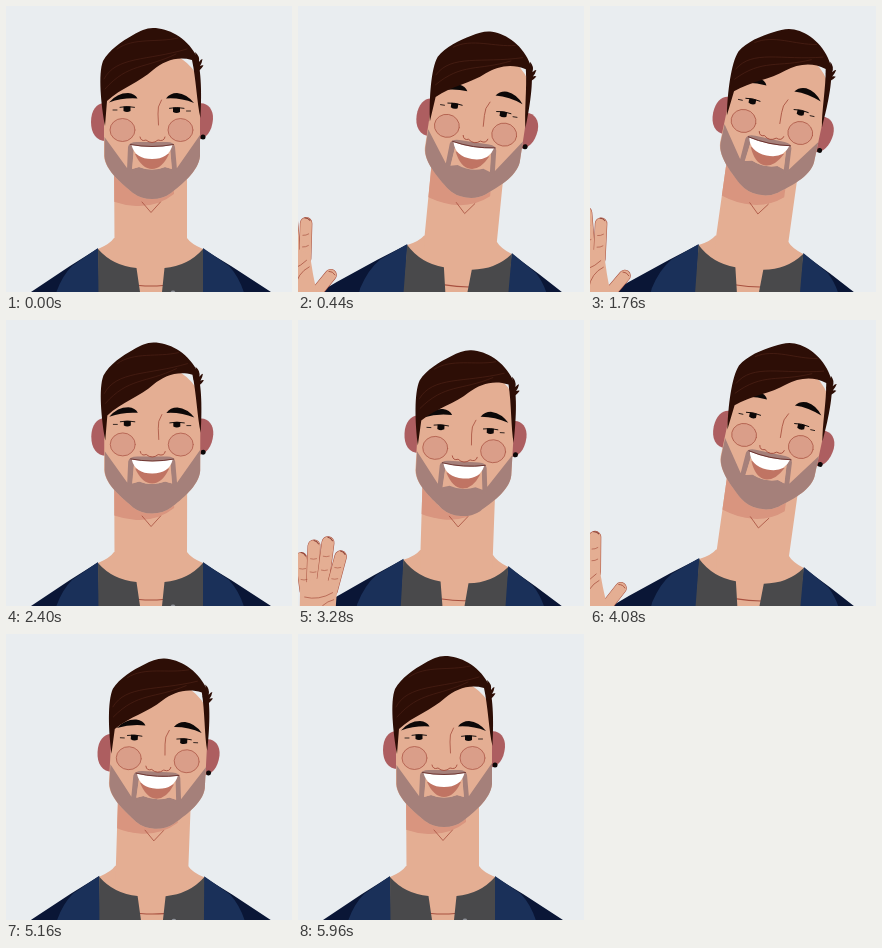
These frames come from a looping animation (286 px wide and 286 px high, 6 s). An HTML page with a canvas:

```html
<!DOCTYPE html>
<html lang="en">
<head>
<meta charset="utf-8">
<title>Waving man</title>
<style>
html, body { margin: 0; width: 100%; height: 100%; overflow: hidden; background: #e9edf0; }
canvas { display: block; width: 100vw; height: 100vh; }
</style>
</head>
<body>
<canvas id="stage"></canvas>
<script>
const SIZE = 286, WAVE = 3000, RAD = Math.PI / 180;
const canvas = document.getElementById('stage');
const ctx = canvas.getContext('2d');
const C = {
  bg: '#e9edf0', skin: '#e4ae93', shade: '#d9957f', beard: '#a5807a', ear: '#ad5e60',
  hair: '#2d0e06', strand: '#54261a', line: '#a8503f', cheek: '#da9e89',
  navy: '#1a3059', dark: '#0a1636', shirt: '#49494b', lip: '#c07463', black: '#0c0808'
};

const smooth = u => u * u * (3 - 2 * u);
const span = (t, a, b) => Math.min(1, Math.max(0, (t - a) / (b - a)));

function fill(d, color) {
  ctx.fillStyle = color;
  ctx.fill(new Path2D(d));
}
function stroke(d, color, width) {
  ctx.strokeStyle = color;
  ctx.lineWidth = width;
  ctx.stroke(new Path2D(d));
}
function dot(x, y, r, color) {
  ctx.beginPath();
  ctx.arc(x, y, r, 0, 2 * Math.PI);
  ctx.fillStyle = color;
  ctx.fill();
}
// Runs draw with (px, py) moved by (dx, dy) and turned by deg around it.
function placed(px, py, dx, dy, deg, draw) {
  ctx.save();
  ctx.translate(px + dx, py + dy);
  ctx.rotate(deg * RAD);
  ctx.translate(-px, -py);
  draw();
  ctx.restore();
}

function pose(p) {
  const back = span(p, 1830, 2600);
  const body = smooth(span(p, 0, 400)) - smooth(span(p, 1700, 2250));
  const head = smooth(span(p, 100, 620)) - smooth(1 - (1 - back) ** 2);
  const nod = Math.sin(Math.PI * span(p, 60, 540)) ** 2;
  const sag = Math.sin(Math.PI * span(p, 1850, 2500)) ** 2;
  return { body, head, nod, sag };
}

function inBody({ body }, draw) {
  placed(144, 243, 17 * body, 0.5 * body, 5 * body, draw);
}

function drawShoulders(state) {
  inBody(state, () => {
    fill('M108 232Q104 238 92 243L93 340H197L197 243Q185 238 181 232Z', C.skin);
    stroke('M133 279.5Q145 280.5 157 279.5', C.line, 1.1);
  });
}

function drawClothes(state) {
  inBody(state, () => {
    fill('M91 243L64 260L25 286L-50 340H94L92 243ZM197 243L225 260L265 286L345 340H195Z', C.dark);
    fill('M92 242L66 260Q55 271 49 290L40 340H95ZM197 242L223 260Q234 272 239 290L248 340H194Z', C.navy);
    fill('M92 243Q107 260 130.5 262L134 286V340H93Z', C.shirt);
    fill('M197 243Q182 260 158.5 262L156 286V340H197Z', C.shirt);
    dot(167, 287, 2.4, '#8d9097');
  });
}

function drawNeck({ body, head }) {
  const a = 5 * body * RAD, cos = Math.cos(a), sin = Math.sin(a);
  const base = x => [
    144 + 17 * body + (x - 144) * cos + 7 * sin,
    243 + 0.5 * body + (x - 144) * sin - 7 * cos
  ];
  const top = 17 * body + 13 * head;
  const [lx, ly] = base(108.5), [rx, ry] = base(181);
  const d = `M${108 + top} 150L${lx} ${ly}L${lx} 248H${rx}L${rx} ${ry}L${181 + top} 150Z`;
  fill(d, C.skin);
  ctx.save();
  ctx.clip(new Path2D(d));
  placed(145, 195, 17 * body + 9 * head, 0, 8 * head, () =>
    fill('M95 150V190Q112 199 130 200Q152 201 168 188V150Z', C.shade));
  ctx.restore();
  placed(145, 200, 17 * body + 7 * head, 1.5 * head, 5 * head, () =>
    stroke('M136 196L145 206.5L154.5 196', C.line, 0.8));
}

function drawEars(drop) {
  placed(0, 0, 0, drop, 0, () => {
    fill('M102 98C93 95 85 102 85 116C85 128 91 136 102 135Z', C.ear);
    fill('M191 98C200 95 207.5 102 207 113C206 126 200 133 191 134Z', C.ear);
    dot(197, 131, 2.5, C.black);
  });
}

function drawEye(x, y, side) {
  fill(`M${x - 3.5} ${y}H${x + 3.5}V${y + 4.5}Q${x} ${y + 6.5} ${x - 3.5} ${y + 4.5}Z`, C.black);
  stroke(`M${x - 7} ${y + 0.8}Q${x} ${y - 0.8} ${x + 7.5} ${y + 0.8}`, C.black, 0.9);
  stroke(`M${x + side * 10} ${y + 3.5}H${x + side * 14}`, C.black, 0.8);
}

function drawFeatures() {
  for (const x of [116.5, 174.5]) {
    ctx.beginPath();
    ctx.ellipse(x, 124, 12.5, 11.5, 0, 0, 2 * Math.PI);
    ctx.fillStyle = C.cheek;
    ctx.fill();
    ctx.strokeStyle = C.line;
    ctx.lineWidth = 0.7;
    ctx.stroke();
  }
  drawEye(121, 100.5, -1);
  drawEye(170.5, 101.5, 1);
  stroke('M155.5 94Q151 101 152 108L152.5 119', C.line, 0.8);
  stroke('M134 131Q135 136 140 134Q146 139 152 134Q158 136 159 131', C.line, 0.9);
}

function drawMouth() {
  fill('M121 164L122 141Q123 136 131 136H161Q168 136 169 141L171 164L166 168L164 142H128L126 168Z', C.beard);
  fill('M128 141H164L166 163L159 161Q146 166 133 161L126 163Z', C.skin);
  fill('M129 148H163Q156 163 146 163Q136 163 129 148Z', C.lip);
  fill('M125.5 139Q146 143 166.5 139Q163 153 146 153Q129 153 125.5 139Z', '#fff');
  stroke('M124.5 138.5Q146 142.5 167.5 138.5', '#6b302c', 0.9);
}

function drawBrows() {
  fill('M103 96.5Q111 87 122 87Q129 87.5 131.5 92.5Q117 91.5 103 96.5Z', C.black);
  fill('M160 92.5Q164 87 171 87Q181 88 188 97Q174 91.5 160 92.5Z', C.black);
}

function drawHair() {
  fill('M99 120C95 98 92 68 97 55C103 44 116 35 127 29C134 25 140 22 147 22' +
    'C162 22 180 31 190 49C195 60 196 85 194.5 112C191 98 190 72 186 54' +
    'C171 50 158 55 147 64C134 76 115 82 101 95Z', C.hair);
  fill('M187 58Q191 53 189 46Q194 50 193 56Q195 53 196.5 53Q196 57 194 60Q196 59 197.5 59.5Q194 65 190 66Z', C.hair);
  stroke('M98 73C110 50 141 55 181 43M99 83C122 57 139 63 170 48M111 43C128 31 151 37 172 32', C.strand, 0.55);
}

function drawHead({ body, head, nod, sag }) {
  const dx = 17 * body + 20 * head + 2 * nod;
  const dy = -3 * head + 4 * nod + 2.5 * sag;
  placed(145.5, 124, dx, dy, 12 * head, () => {
    drawEars(6 * head - 4 * nod + 2 * sag);
    const jaw = 'C99 165 118 179 127 187Q135 193 146 193Q157 193 165 187C175 179 193 165 194 150V';
    fill('M98 75V150' + jaw + '75Q180 45 145 45Q110 45 98 75Z', C.skin);
    fill('M98.5 131V150' + jaw + '129L171 162L166 163L159 161Q146 166 133 161L126 163L121 162Z', C.beard);
    placed(0, 0, 0, 2.5 * nod, 0, () => {
      drawMouth();
      drawFeatures();
      placed(0, 0, 0, -8 * head, 0, drawBrows);
    });
    placed(0, 0, 0, 2 * head + 4.5 * nod, 0, drawHair);
  });
}

function finger(x0, y0, x1, y1, width) {
  const d = `M${x0} ${y0}L${x1} ${y1}`;
  stroke(d, C.line, width + 1);
  stroke(d, C.skin, width);
}

function drawHand(p) {
  if (p < 205 || p > 2150) return;
  const rise = 1 - (1 - span(p, 205, 385)) ** 3 - smooth(span(p, 1970, 2150));
  const sway = -16 - 24 * Math.cos(2 * Math.PI * (p - 1090) / 600);
  ctx.save();
  ctx.translate(22 + 0.8 * sway, 248 + 75 * (1 - rise));
  ctx.rotate(0.38 * sway * RAD);
  finger(10, 48, 34, 30, 11);
  stroke('M33 26Q37 27 38 31', C.line, 0.8);
  const tips = [[-13, 8, -17, -25, 11], [-6, 3, -4, -37, 12], [4, 2, 10, -40, 12], [13, 8, 22.5, -26, 11.5]];
  tips.forEach(f => finger(...f));
  fill('M-18.5 5Q-10 -5 0 -4Q11 -5 18.5 6L17 24Q16 40 14 130H-14L-19 24Z', C.skin);
  for (const [x0, y0, x1, y1] of tips) {
    for (const k of [0.35, 0.68]) {
      const x = x0 + (x1 - x0) * k, y = y0 + (y1 - y0) * k;
      stroke(`M${x - 3} ${y}Q${x} ${y + 1} ${x + 3} ${y}`, C.line, 0.6);
    }
    stroke(`M${x1} ${y1 - 5.5}Q${x1 + 3} ${y1 - 5} ${x1 + 4.5} ${y1 - 2}`, '#8a3f36', 1);
  }
  stroke('M-14 14Q0 18 14 10M15 17Q2 20 -4 34', C.line, 0.7);
  ctx.restore();
}

function frame(now) {
  const dpr = window.devicePixelRatio || 1;
  const w = Math.round(innerWidth * dpr), h = Math.round(innerHeight * dpr);
  if (canvas.width !== w || canvas.height !== h) {
    canvas.width = w;
    canvas.height = h;
  }
  ctx.setTransform(w / SIZE, 0, 0, h / SIZE, 0, 0);
  ctx.lineCap = ctx.lineJoin = 'round';
  ctx.fillStyle = C.bg;
  ctx.fillRect(0, 0, SIZE, SIZE);
  const p = now % WAVE, state = pose(p);
  drawShoulders(state);
  drawNeck(state);
  drawClothes(state);
  drawHead(state);
  drawHand(p);
}

let start;
function tick(now) {
  start ??= now;
  frame(now - start);
  requestAnimationFrame(tick);
}
frame(0);
requestAnimationFrame(tick);
</script>
</body>
</html>
```
